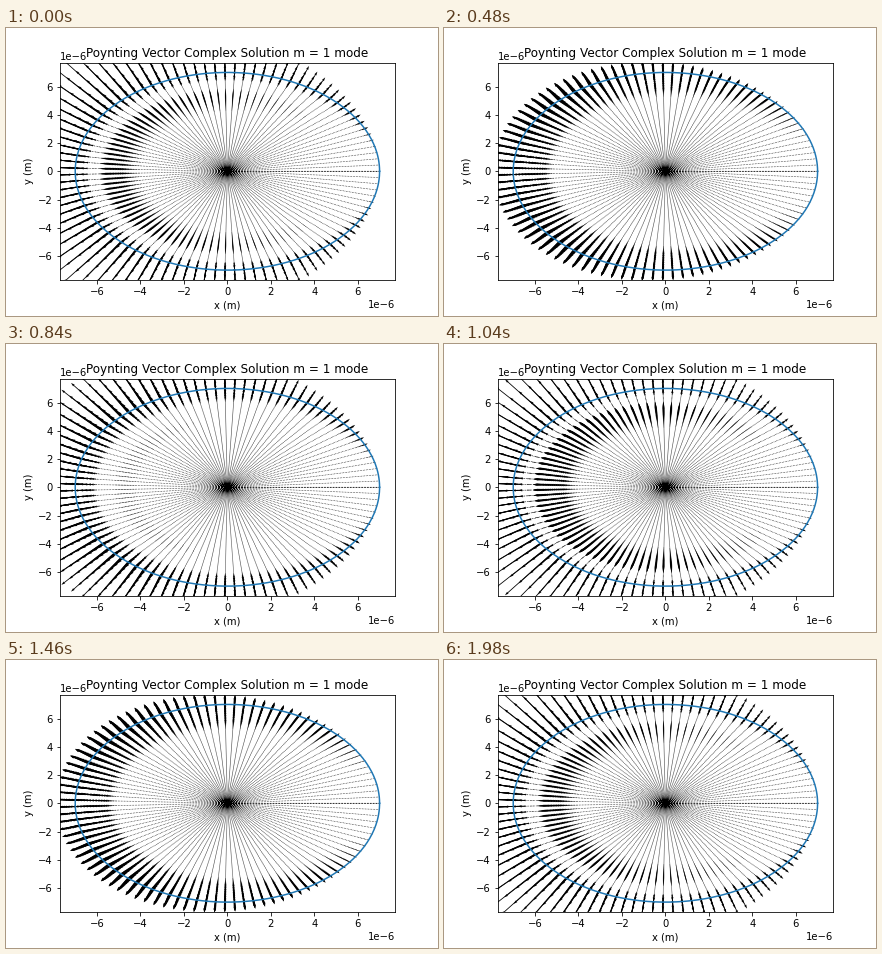
A matplotlib script that plays this animation: 432x288 px, repeating every 2 s.

```python
import numpy as np
import matplotlib.pyplot as plt
from matplotlib.animation import FuncAnimation
from matplotlib.patches import PathPatch
from matplotlib.path import Path

FRAMES = 100
RADIUS = 7e-6
LIMIT = 1.1 * RADIUS
SHAFT = 0.0024            # shaft width as a fraction of the axes width
SCALE = 180               # mean arrow length is 1/SCALE of the axes width

# Radial wave, lengths in micrometres
GROWTH = 1.6
PULSE = 3.1               # distance between successive pulses
START = 6.145
LAG = 0.35                # phase lag between the E and H fields

fig, ax = plt.subplots(figsize=(6, 4), dpi=72)
fig.subplots_adjust(left=0.125, right=0.9, bottom=0.125, top=0.88)

theta, r = np.meshgrid(np.linspace(0, 2 * np.pi, 100),
                       np.linspace(0, RADIUS, 100))
x, y = r * np.cos(theta), r * np.sin(theta)


def power(phase):
    """Radial Poynting component, normalised to a mean size of one."""
    u = r * 1e6 - START - PULSE * phase
    s = np.exp(GROWTH * u) * (np.cos(LAG) - np.cos(2 * np.pi * u / PULSE))
    s = s * (1 - np.cos(theta))
    return s / np.abs(s).mean()


def dots(px, py):
    """One compound path of small hexagons, round on screen."""
    box = ax.get_position()
    aspect = box.width * 6 / (box.height * 4)
    size = 0.5 * SHAFT * 2 * LIMIT
    a = np.arange(7) * np.pi / 3
    hexagon = np.column_stack([size * np.cos(a), size * aspect * np.sin(a)])
    centres = np.column_stack([px.ravel(), py.ravel()])
    verts = (centres[:, None] + hexagon).reshape(-1, 2)
    codes = [Path.MOVETO] + [Path.LINETO] * 5 + [Path.CLOSEPOLY]
    path = Path(verts, np.tile(codes, len(centres)))
    return PathPatch(path, fc="black", lw=0, snap=False)


ring = np.linspace(0, 2 * np.pi, 400)
ax.plot(RADIUS * np.cos(ring), RADIUS * np.sin(ring), color="C0")
ax.set_xlim(-LIMIT, LIMIT)
ax.set_ylim(-LIMIT, LIMIT)
ax.set_xlabel("x (m)")
ax.set_ylabel("y (m)")
ax.set_title("Poynting Vector Complex Solution m = 1 mode", y=1.0)

# Alternate rings, so that neighbouring dots blend separately
for k in (0, 1):
    ax.add_patch(dots(x[k::2], y[k::2]))

shown = []


def update(frame):
    while shown:
        shown.pop().remove()
    s = power(2 * frame / (FRAMES - 1))
    seen = np.abs(s) >= SHAFT * SCALE
    s, a = s[seen], theta[seen]
    shown.append(ax.quiver(x[seen], y[seen], s * np.cos(a), s * np.sin(a),
                           scale=SCALE, width=SHAFT, units="width"))
    return shown


anim = FuncAnimation(fig, update, frames=FRAMES, interval=20,
                     init_func=lambda: update(0), repeat=True, repeat_delay=0)
plt.show()
```
